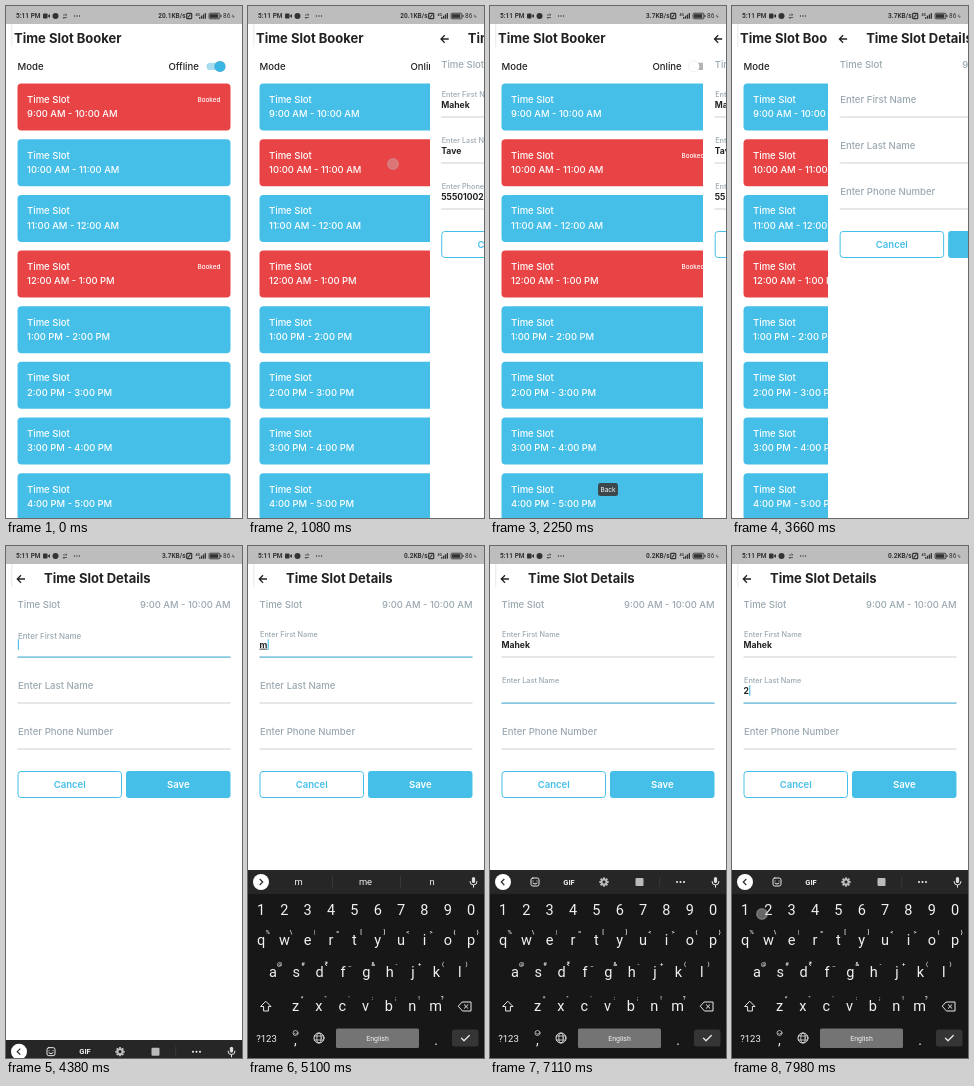
An HTML page that plays this animation: 236 by 512 pixels, repeating every 8000 ms.

```html
<!DOCTYPE html>
<html lang="en">
<head>
<meta charset="utf-8">
<title>Time Slot Booker</title>
<style>
  html, body { margin: 0; width: 100%; height: 100%; overflow: hidden; background: #fff; }
  svg { display: block; width: 100vw; height: 100vh; font-family: Inter, sans-serif; }
  .mid { text-anchor: middle; }
  .end { text-anchor: end; }
  .title { font-size: 13px; font-weight: 700; fill: #222; }
  .body { font-size: 9.55px; font-weight: 500; }
  .hours { font-size: 9.4px; font-weight: 500; }
  .value { font-size: 8.6px; font-weight: 700; fill: #222; }
  .grey { fill: #9aa8b0; }
  .keys { font-family: Roboto, sans-serif; fill: #f1f1f1; }
  .line { fill: none; stroke: #e8e8e8; stroke-width: 1; stroke-linecap: round; stroke-linejoin: round; }

  #details { animation: push 8s linear infinite; }
  #keyboard { animation: rise 8s linear infinite; }
  #thumb { animation: thumb 8s linear infinite; }
  #track { animation: track 8s linear infinite; }
  #tip { animation: tip 8s linear infinite; }
  .label { font-size: 9.6px; font-weight: 500; animation: 8s linear infinite; }
  #label0 { animation-name: float0; }
  #label1 { animation-name: float1; }
  #label2 { animation-name: float2; }

  @keyframes push {
    0%, 12.65% { transform: translateX(236px); }
    16.4%, 24.75% { transform: none; }
    28.5%, 43.54% { transform: translateX(236px); }
    47.29%, 100% { transform: none; }
  }
  @keyframes rise {
    0%, 54.5% { transform: translateY(190px); animation-timing-function: ease-out; }
    58.5%, 100% { transform: none; }
  }
  @keyframes thumb {
    0%, 1.9% { transform: translateX(10px); fill: #3bb5e3; animation-timing-function: ease-in-out; }
    4.4%, 100% { transform: none; fill: #fff; }
  }
  @keyframes track {
    0%, 1.9% { fill: #a8dcf1; }
    4.4%, 100% { fill: #b3b3b3; }
  }
  @keyframes tip {
    0%, 24.5% { opacity: 0; }
    26%, 29.5% { opacity: .95; }
    31.8%, 100% { opacity: 0; }
  }
  @keyframes float0 {
    0%, 28.7% { transform: translate(12px, 90.7px) scale(.76); }
    28.71%, 53.25% { transform: translate(12px, 97.4px); }
    55.375%, 100% { transform: translate(12px, 90.7px) scale(.76); }
  }
  @keyframes float1 {
    0%, 28.7% { transform: translate(12px, 90.7px) scale(.76); }
    28.71%, 82.5% { transform: translate(12px, 97.4px); }
    84.6%, 100% { transform: translate(12px, 90.7px) scale(.76); }
  }
  @keyframes float2 {
    0%, 28.7% { transform: translate(12px, 90.7px) scale(.76); }
    28.71%, 100% { transform: translate(12px, 97.4px); }
  }
</style>
</head>
<body>
<svg id="stage" viewBox="0 0 236 512" preserveAspectRatio="none"></svg>
<script>
const LOOP = 8000, RED = '#e84446', BLUE = '#45bfe8';
const $ = id => document.getElementById(id);
const escapeText = str => str.replace(/&/g, '&amp;').replace(/</g, '&lt;');
const text = (x, y, str, cls = '', attrs = '') =>
  `<text x="${x}" y="${y}" class="${cls}" ${attrs}>${escapeText(str)}</text>`;
const rect = (x, y, w, h, r, attrs) =>
  `<rect x="${x}" y="${y}" width="${w}" height="${h}" rx="${r}" ${attrs}/>`;
const path = (d, attrs = 'class="line"') => `<path d="${d}" ${attrs}/>`;

// Slot list
const hours = ['9:00 AM', '10:00 AM', '11:00 AM', '12:00 AM', '1:00 PM', '2:00 PM', '3:00 PM', '4:00 PM', '5:00 PM'];
const card = i => `<g transform="translate(0 ${77.6 + 55.65 * i})">
  ${rect(11.5, 0, 213, 47, 4, `id="card${i}"`)}
  <g fill="#fff">${text(21, 19.4, 'Time Slot', 'body')}
  ${text(21, 33.7, `${hours[i]} - ${hours[i + 1]}`, 'hours')}
  ${text(214.5, 18.4, 'Booked', 'end', `id="tag${i}" font-size="6.4" font-weight="500"`)}</g></g>`;

const list = `<g>
  ${rect(0, 18, 236, 494, 0, 'fill="#fff"')}
  ${text(8, 37.2, 'Time Slot Booker', 'title')}
  ${text(11.5, 63.8, 'Mode', 'body', 'fill="#222"')}
  ${text(162.5, 63.8, '', 'body', 'id="mode" fill="#222"')}
  ${rect(200.5, 56.7, 17, 7.4, 3.7, 'id="track"')}
  <circle id="thumb" cx="204" cy="60.4" r="5.5" stroke="#0002" stroke-width=".5"/>
  ${hours.slice(0, 8).map((_, i) => card(i)).join('')}</g>`;

// Details form
const field = (name, i) => `<g transform="translate(0 ${46 * i})">
  ${text(0, 0, name, 'label grey', `id="label${i}"`)}
  ${text(11.5, 101.7, '', 'value', `id="value${i}"`)}
  ${rect(11.5, 110.5, 213, 1, 0, `id="rule${i}"`)}
  ${rect(0, 93.3, 1.1, 10.5, 0, `id="caret${i}" fill="${BLUE}"`)}</g>`;

const details = `<g id="details">
  ${rect(0, 18, 236, 494, 0, 'fill="#fff"')}
  ${path('M19 33H11.3M15 29.3L11.3 33L15 36.7', 'fill="none" stroke="#222" stroke-width="1.3"')}
  ${text(38, 37.2, 'Time Slot Details', 'title')}
  ${text(11.5, 62.4, 'Time Slot', 'body grey')}
  ${text(224.5, 62.4, '', 'hours grey end', 'id="slot"')}
  ${['Enter First Name', 'Enter Last Name', 'Enter Phone Number'].map(field).join('')}
  ${rect(12, 225.5, 103.5, 26, 3, `fill="#fff" stroke="${BLUE}"`)}
  ${rect(120, 225, 104.5, 27, 3, `fill="${BLUE}"`)}
  ${text(63.7, 242, 'Cancel', 'body mid', `fill="${BLUE}" style="font-weight:600"`)}
  ${text(172.3, 242, 'Save', 'body mid', 'fill="#fff" style="font-weight:600"')}</g>`;

// Keyboard
const keyRow = (keys, hints, x0, y) => [...keys].map((key, i) => {
  const x = x0 + 23.35 * i;
  const hint = hints[i] ? text(x + 6.7, y - 11.2, hints[i], 'mid', 'font-size="6" font-weight="500"') : '';
  return text(x, y, key, 'mid', 'font-size="14.5"') + hint;
}).join('');

const gearTeeth = Array.from({ length: 8 }, (_, i) =>
  rect(113, 331.3, 2, 3, .4, `fill="#bbb" transform="rotate(${45 * i} 114 336)"`)).join('');

const keyboard = `<g id="keyboard" class="keys">
  ${rect(0, 324, 236, 188, 0, 'fill="#171717"')}
  ${rect(0, 324, 236, 24, 0, 'fill="#262626"')}
  <circle cx="13" cy="336" r="8" fill="#fff"/>
  ${path('', 'id="chevron" fill="none" stroke="#333" stroke-width="1.3"')}
  <g id="tools">
    ${rect(41, 332, 8, 8, 1.8, 'class="line"')}${path('M43 335h.1M47 335h.1M43 337.3q2 1.7 4 0')}
    ${text(79, 338.7, 'GIF', 'mid', 'font-size="7.5" font-weight="700"')}
    ${gearTeeth}<circle cx="114" cy="336" r="2.6" fill="none" stroke="#bbb" stroke-width="1.8"/>
    ${rect(145.5, 332, 8, 8, 1, 'fill="#bbb"')}
    ${rect(169.5, 331, .6, 10, 0, 'fill="#444"')}
    <circle cx="187" cy="336" r="1"/><circle cx="190.5" cy="336" r="1"/><circle cx="194" cy="336" r="1"/>
  </g>
  <g id="words" font-size="9.4">
    ${rect(84, 330, .6, 12, 0, 'fill="#444"')}${rect(152, 330, .6, 12, 0, 'fill="#444"')}
    ${text(50.5, 339.3, '', 'mid', 'id="word0"')}
    ${text(117.5, 339.3, '', 'mid', 'id="word1"')}
    ${text(117.5, 342, '', 'mid', 'id="wordSub" font-size="6.5"')}
    ${text(184, 339.3, '', 'mid', 'id="word2"')}
  </g>
  ${rect(223.9, 331, 3.2, 6, 1.6, 'fill="#ddd"')}${path('M222 335.5a3.5 3.5 0 0 0 7 0M225.5 339.2v2')}
  ${keyRow('1234567890', '', 13, 369)}
  ${keyRow('qwertyuiop', '%\\|=[]<>{}', 13, 399)}
  ${keyRow('asdfghjkl', '@#₹_&-+()', 25, 431)}
  ${keyRow('zxcvbnm', '*"\':;!?', 47.5, 465)}
  ${path('M18 455.5l5 5h-2.6v4.5h-4.8v-4.5H13z')}
  ${path('M214.5 456h8.5v9h-8.5l-4-4.5zM216.3 458.7l3.6 3.6M219.9 458.7l-3.6 3.6')}
  ${text(18.5, 495.5, '?123', 'mid', 'font-size="9.5"')}
  ${text(47.5, 499, ',', 'mid', 'font-size="14"')}
  <circle cx="47.5" cy="487" r="2.5" class="line" style="stroke-width:.7"/>
  ${path('M46.2 487.6q1.3 1.4 2.6 0', 'class="line" style="stroke-width:.6"')}
  <circle cx="71" cy="492" r="5" class="line"/>
  <ellipse cx="71" cy="492" rx="2.2" ry="5" class="line" style="stroke-width:.8"/>
  ${path('M66.5 490h9M66.5 494h9', 'class="line" style="stroke-width:.8"')}
  ${rect(88, 482.5, 83, 19.5, 1.5, 'fill="#747474"')}
  ${text(129.5, 494.7, 'English', 'mid', 'font-size="7"')}
  ${text(188, 499, '.', 'mid', 'font-size="14"')}
  ${rect(204, 483.5, 26.5, 17, 2.5, 'fill="#353535"')}
  ${path('M213.5 492.3l2.5 2.5l5.3-5.3', 'class="line" style="stroke-width:1.3"')}</g>`;

const statusBar = `<g fill="#333" font-size="6.5" font-weight="600" font-family="Roboto, sans-serif">
  ${rect(0, 0, 236, 18, 0, 'fill="#bdbdbd"')}
  ${text(10, 12.3, '5:11 PM')}
  ${rect(37, 7.5, 4.5, 5, .8, '')}${path('M41.5 10l2.5-2v4z', '')}
  <circle cx="49.5" cy="10" r="3"/>
  ${path('M57 9h4l-1.5-1.5M61 11.5h-4l1.5 1.5', 'fill="none" stroke="#444" stroke-width=".8"')}
  <circle cx="68.5" cy="10" r=".7"/><circle cx="71" cy="10" r=".7"/><circle cx="73.5" cy="10" r=".7"/>
  ${text(179.5, 12.3, '', 'end', 'id="speed"')}
  ${rect(180.7, 7.3, 5, 5.4, .8, 'fill="none" stroke="#333" stroke-width="1.2"')}${path('M182 11.5l2.4-3', 'stroke="#333" stroke-width="1.2"')}
  ${text(189.5, 9.5, '4G', '', 'font-size="3.5"')}
  ${[0, 1, 2, 3].map(i => rect(193 + 1.9 * i, 11 - 1.3 * i, 1.3, 1.7 + 1.3 * i, 0, '')).join('')}
  ${rect(203, 7.2, 11, 5.6, 1.2, 'fill="#999" stroke="#333" stroke-width=".8"')}${rect(204, 8.2, 8, 3.6, .4, '')}${rect(214.5, 9, 1, 2, 0, '')}
  ${text(217, 12.3, '86', '', 'font-weight="400"')}
  ${path('M227 8.5l-1 1.8h2.2l-.8 1.7', 'fill="none" stroke="#555" stroke-width=".7"')}
  ${rect(5.5, 18, .7, 23, 0, 'fill="#dedede"')}</g>`;

$('stage').innerHTML = list + details + keyboard + statusBar + `
  <g id="tip">${rect(108, 477, 20, 13, 2.5, 'fill="#3d4245"')}${text(118, 486, 'Back', 'mid', 'fill="#fff" font-size="6.5"')}</g>
  <circle id="touch" r="5.4" fill="#c8c8c8" fill-opacity=".45" stroke="#bbb" stroke-opacity=".4" stroke-width="1.4"/>`;

// Timed states: [start, ...values]
const speeds = [[0, '20.1KB/s'], [1200, '3.7KB/s'], [4500, '0.2KB/s']];
const firstNames = [[0, 'Mahek'], [2297, ''], [5000, 'm'], [5290, 'ma'], [5520, 'mah'], [5760, 'mahe'], [6020, 'Mahek']];
const lastNames = [[0, 'Tave'], [2297, ''], [7880, '2']];
const phones = [[0, '5550100234'], [2297, '']];
const suggestions = [
  [0], [5000, 'm', 'me', 'n'], [5290, 'ma', 'may', 'man'], [5520, 'mah', 'math', 'main'],
  [5760, 'mahe', 'make', 'made'], [6020, 'Mahek', 'mahektave42', 'Mahekta', '@inbox.test'], [6640]
];
const focusSpans = [[4260, 6600], [6600, LOOP]];
// start, end, x, y
const taps = [
  [40, 240, 209, 60], [860, 1130, 145, 158], [1840, 2020, 15, 33], [3250, 3490, 145, 103], [4150, 4290, 60, 95],
  [4950, 5060, 188, 460], [5240, 5350, 25, 426], [5470, 5580, 141, 426], [5710, 5820, 59, 394], [5970, 6080, 188, 426],
  [6470, 6630, 70, 144], [7800, 8060, 30, 368]
];

const latest = (states, t) => states.filter(s => s[0] <= t).pop();
const show = (id, on) => $(id).style.visibility = on ? 'visible' : 'hidden';
const put = (id, str = '') => { if ($(id).textContent !== str) $(id).textContent = str; };

function drawField(i, states, t) {
  const [changed, str] = latest(states, t);
  const span = focusSpans[i];
  const focused = !!span && t >= span[0] && t < span[1];
  put(`value${i}`, str);
  $(`value${i}`).style.textDecoration = i === 0 && focused ? 'underline' : 'none';
  $(`rule${i}`).setAttribute('fill', focused ? '#4fb0d4' : '#d0d0d0');
  $(`rule${i}`).setAttribute('height', focused ? 1.2 : 1);
  const since = focused ? t - Math.max(changed, span[0]) : 0;
  show(`caret${i}`, focused && since % 1000 < 500);
  if (focused) $(`caret${i}`).setAttribute('x', 11.8 + (str ? $(`value${i}`).getComputedTextLength() : 0));
}

function render(t) {
  const online = t >= 400;
  put('speed', latest(speeds, t)[1]);
  put('mode', t >= 210 ? 'Online' : 'Offline');
  put('slot', t < 2297 ? '10:00 AM - 11:00 AM' : '9:00 AM - 10:00 AM');
  for (let i = 0; i < 8; i++) {
    const booked = i === 3 || i === (online ? 1 : 0);
    $(`card${i}`).setAttribute('fill', booked ? RED : BLUE);
    show(`tag${i}`, booked);
  }
  [firstNames, lastNames, phones].forEach((states, i) => drawField(i, states, t));

  const [, left, middle, right, sub] = latest(suggestions, t);
  show('words', left);
  show('tools', !left);
  put('word0', left);
  put('word1', middle);
  put('word2', right);
  put('wordSub', sub);
  $('word1').setAttribute('y', sub ? 333.3 : 339.3);
  $('word1').setAttribute('font-size', sub ? 8.3 : 9.4);
  $('chevron').setAttribute('d', left ? 'M11.7 333l3 3l-3 3' : 'M14.3 333l-3 3l3 3');

  const tap = taps.find(([from, to]) => t >= from && t < to);
  show('touch', tap);
  if (tap) {
    $('touch').setAttribute('cx', tap[2]);
    $('touch').setAttribute('cy', tap[3]);
    $('touch').style.opacity = Math.min(1, (tap[1] - t) / 60);
  }
}

let start;
function tick(now) {
  start ??= now;
  render((now - start) % LOOP);
  requestAnimationFrame(tick);
}
render(0);
requestAnimationFrame(tick);
</script>
</body>
</html>
```
